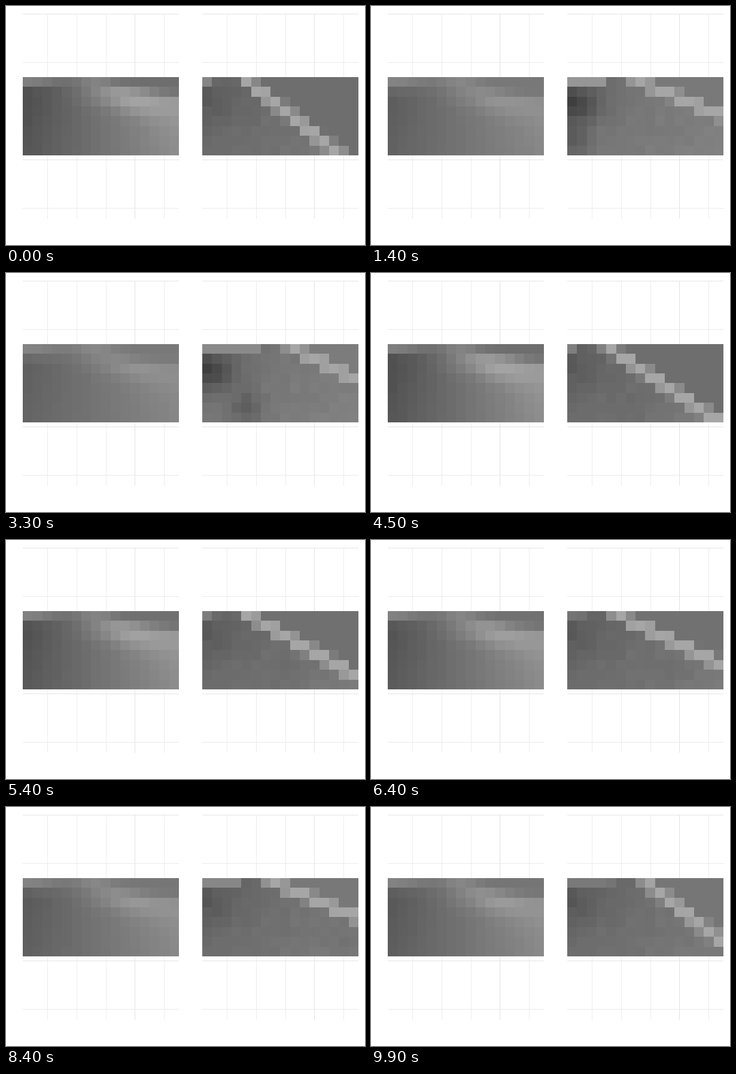
A matplotlib script that plays this animation: 600 by 400 pixels, repeating every 10000 ms.

```python
import numpy as np
import matplotlib.pyplot as plt
from matplotlib.animation import FuncAnimation
from matplotlib.patches import Rectangle

W, H, DPI = 600, 400, 100
FRAMES, STEP = 100, 100
ROWS, COLS = 8, 16
CELL = 16.3
PANELS = (28, 328)
TOP = 119.3
GLOW = 166

R, C = np.mgrid[0:ROWS, 0:COLS].astype(float)
GRAIN = np.random.default_rng(4).normal(0, 1.5, (ROWS, COLS))

# seconds, softness, ridge start, ridge slope, top grey, shadow depth
KEYS = np.array([(0.0, 0.00, 4.7, 1.27, 133, 9),
                 (1.4, 0.85, 7.5, 2.40, 150, 46),
                 (3.3, 1.00, 9.5, 2.00, 138, 46),
                 (4.5, 0.00, 4.4, 1.50, 131, 9),
                 (6.4, 0.30, 5.4, 2.08, 116, 9),
                 (8.4, 0.70, 7.5, 2.35, 135, 13),
                 (9.9, 0.55, 8.2, 1.27, 122, 13)])


def mix(a, b, u):
    return a + (b - a) * u


def bump(x, centre, width):
    return np.exp(-((x - centre) / width) ** 2)


def smooth_panel(soft):
    """Sky on top, a slope brightening to the right, a glowing crest between."""
    sky = (mix(110, 122, soft)
           + mix(20, 10, soft) * bump(C, 0, 2.5)
           + mix(22, 14, soft) * bump(C, 7, 1.9))
    tilt = mix(4.2, 2.6, soft) * (1 - .05 * (R - 4))
    ground = mix(112, 116, soft) + tilt * (C - 7)
    crest = 1 + .25 * np.maximum(C - 8, 0)
    ground += mix(36, 20, soft) * bump(C, 10, 4) * bump(R, crest, 1.5)
    edge = mix(.5, .85, soft) + .13 * np.maximum(C - 9, 0)
    return mix(sky, ground, 1 / (1 + np.exp((edge - R) / .18)))


def sharp_panel(t, soft, start, slope, top, depth):
    """Mottled ground with drifting shadows below one slanted bright ridge."""
    centre = start + slope * R
    ground = mix(98 + .3 * depth, 119 + .18 * depth, C / (COLS - 1))
    ground += GRAIN + 1.5 * (R - 3) * (1 - C / COLS)
    ground -= depth * bump(R, 2.3, 1.8) * bump(C, 0, 2.8)
    ground -= .55 * depth * bump(R, 6, 1.7) * bump(C, 2 * (t - 1.3), 1.7)
    grid = np.where(C > centre, 110 + 14 * soft, ground)
    edge = np.clip(start - 4 - C + .5, 0, 1)
    grid = np.where(R == 0, mix(grid, top, edge), grid)

    half = (slope + .7) / 2 * np.where(R == 0, .75, 1)
    overlap = np.minimum(centre + half, C + 1) - np.maximum(centre - half, C)
    return mix(grid, GLOW, np.clip(overlap, 0, 1))


fig = plt.figure(figsize=(W / DPI, H / DPI), dpi=DPI, facecolor="white")
ax = fig.add_axes([0, 0, 1, 1])
ax.axis("off")


def bar(x, y, w, h, color):
    ax.add_patch(Rectangle((x, y), w, h, color=color, lw=0, antialiased=False))


images = []
for x0 in PANELS:
    for col in range(2, COLS, 3):
        bar(round(x0 + (col + .5) * CELL), 13, 1, 343,
            "#e3e3e3" if col == 11 else "#ededed")
    for n, y in enumerate((13, 94, 257, 338)):
        bar(x0, y, 261, 1, "#ebebeb" if n % 2 else "#e4e4e4")
    extent = (x0 + .3, x0 + .3 + COLS * CELL, TOP + ROWS * CELL, TOP)
    images.append(ax.imshow(np.zeros((ROWS, COLS)), cmap="gray", vmin=0,
                            vmax=255, extent=extent, interpolation="nearest",
                            aspect="auto", zorder=3))
ax.set_xlim(0, W)
ax.set_ylim(H, 0)


def update(i):
    t = i * STEP / 1000
    soft, *rest = (np.interp(t, KEYS[:, 0], k) for k in KEYS.T[1:])
    images[0].set_data(smooth_panel(soft))
    images[1].set_data(sharp_panel(t, soft, *rest))
    return images


anim = FuncAnimation(fig, update, frames=FRAMES, interval=STEP,
                     init_func=lambda: update(0), repeat=True, repeat_delay=0)
plt.show()
```
